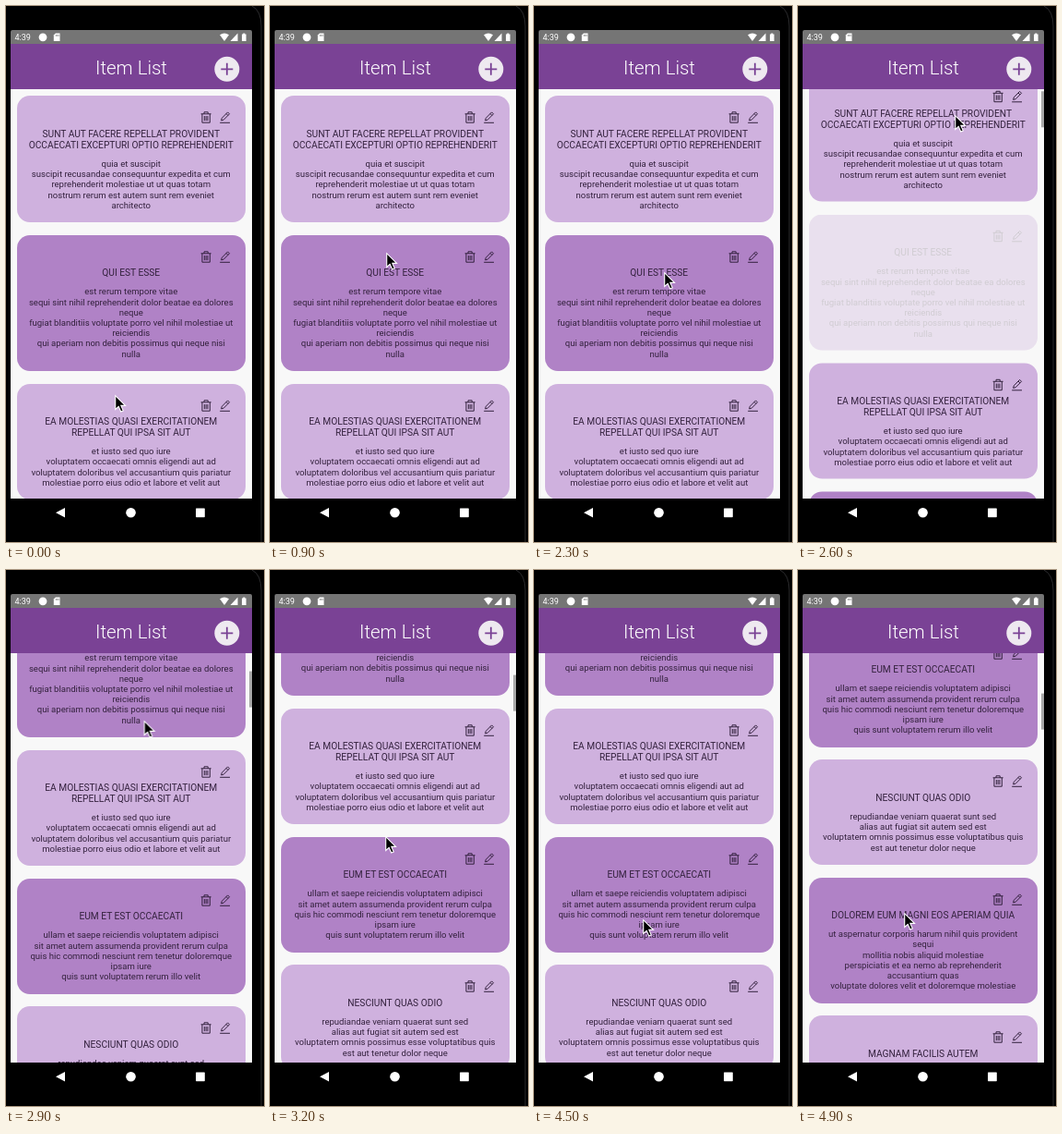
An HTML page that plays this animation: 280x580 px, repeating every 5000 ms.

```html
<!DOCTYPE html>
<html lang="en">
<head>
<meta charset="utf-8">
<title>Item List</title>
<style>
  @property --y { syntax: '<number>'; inherits: true; initial-value: 0; }

  html, body { margin: 0; width: 100%; height: 100%; overflow: hidden; background: #000; }
  .stage { position: relative; width: 280px; height: 580px; overflow: hidden; background: #000; font-family: Roboto, sans-serif; }
  .stage > * { position: absolute; }
  svg { display: block; overflow: visible; }

  .status { left: 5px; top: 26px; width: 262px; height: 15px; background: #757575; border-radius: 2px 2px 0 0; }
  .clock { left: 9.5px; top: 28px; font-size: 9px; line-height: 12px; color: #fff; }
  .header { left: 5px; top: 41px; width: 262px; height: 49.5px; background: #7a4295; }
  .header h1 { margin: 0; font-size: 20.4px; line-height: 52px; font-weight: 300; text-align: center; color: #fff; }

  .list { left: 5px; top: 90px; width: 262px; height: 442.5px; overflow: hidden; background: #f8f8f8; animation: scroll 5s infinite step-end; }
  .cards { position: absolute; left: 6.5px; top: 7.3px; width: 248.5px; transform: translateY(calc(var(--y) * -1px)); }
  .card { position: relative; margin-bottom: 13.4px; padding: 35.35px 0 13.4px; border-radius: 14px; background: #cfb1de; color: #33213d; text-align: center; white-space: pre; }
  .card:nth-child(even) { background: #b082c6; }
  .card:nth-child(2) { animation: press 5s infinite step-end; }
  .card:last-child { min-height: 80px; }
  .card svg { position: absolute; left: 199px; top: 17px; }
  .card h2 { margin: 0 0 8.45px; font-size: 10.2px; line-height: 11.9px; font-weight: 400; }
  .card p { margin: 0; font-size: 9.54px; line-height: 11.2px; }

  .bar { position: absolute; right: 0; top: 0; width: 3px; height: 39px; background: #a9a9a9; opacity: 0; transform: translateY(calc(var(--y) * .09px + .3px)); animation: bar 5s infinite step-end; }
  .cursor { left: 0; top: 0; animation: point 5s infinite step-end; }

  @keyframes scroll {
    0%, 50% { --y: 0; }
    52% { --y: 22.5; }
    54% { --y: 96; }
    56% { --y: 168; }
    58% { --y: 214; }
    60% { --y: 241; }
    62% { --y: 254; }
    64%, 90% { --y: 259; }
    92% { --y: 290; }
    94% { --y: 376; }
    96% { --y: 446; }
    98%, 100% { --y: 481; }
  }
  @keyframes press {
    0%, 48% { opacity: 1; }
    50% { opacity: .6; }
    52% { opacity: .2; }
    54% { opacity: .35; }
    56% { opacity: .7; }
    58%, 100% { opacity: 1; }
  }
  @keyframes bar {
    0% { opacity: 0; }
    52% { opacity: 1; }
    66% { opacity: 1; animation-timing-function: steps(4); }
    74% { opacity: 0; }
    92%, 100% { opacity: 1; }
  }
  @keyframes point {
    0% { transform: translate(118px, 421px); animation-timing-function: steps(9); }
    18% { transform: translate(126px, 267px); }
    26% { transform: translate(126px, 267px); animation-timing-function: steps(4); }
    34% { transform: translate(126px, 370px); animation-timing-function: steps(2); }
    38% { transform: translate(126px, 394px); animation-timing-function: steps(2); }
    42% { transform: translate(129px, 376px); animation-timing-function: steps(2); }
    46% { transform: translate(141px, 288px); animation-timing-function: steps(2); }
    50% { transform: translate(165px, 124px); }
    52% { transform: translate(170px, 118px); }
    54% { transform: translate(168px, 68px); animation-timing-function: steps(4); }
    62% { transform: translate(131px, 258px); }
    64% { transform: translate(125px, 288px); animation-timing-function: steps(6); }
    76% { transform: translate(121px, 378px); animation-timing-function: steps(5); }
    86% { transform: translate(118px, 396px); animation-timing-function: steps(2); }
    90% { transform: translate(118px, 378px); }
    92% { transform: translate(125px, 250px); }
    94% { transform: translate(136px, 62px); }
    96% { transform: translate(127px, 230px); }
    98%, 100% { transform: translate(115px, 371px); }
  }
</style>
</head>
<body>
<div class="stage">
  <svg width="280" height="580" fill="none">
    <path d="M267 0Q277 5 277 22V580" stroke="#2b2b2d"/>
  </svg>

  <div class="status"></div>
  <div class="clock">4:39</div>
  <div class="header"><h1>Item List</h1></div>

  <div class="list">
    <div class="cards"></div>
    <div class="bar"></div>
  </div>

  <svg width="280" height="580" fill="#fff">
    <circle cx="40" cy="33.8" r="4.4"/>
    <path d="M53.8 29.5H58.5V38H51.8V31.6Z"/>
    <path d="M54.3 31v1.8M55.7 31v1.8M57.1 31v1.8" stroke="#757575" stroke-width=".7"/>
    <path d="M232 31.3Q237 27.6 242 31.3L237 38Z"/>
    <path d="M251.5 29.5V38H243.5Z"/>
    <path d="M256 30.4h1.3v-1h2v1h1.3V38H256Z"/>
    <circle cx="239.8" cy="68.3" r="13.5" fill="#eee9f0"/>
    <path d="M233.3 68.3h13M239.8 61.8v13" stroke="#7a4295" stroke-width="1.8"/>
    <path d="M54 548.3L64 543V553.6Z"/>
    <circle cx="135.5" cy="548.3" r="5.3"/>
    <rect x="206" y="543.4" width="9.8" height="9.8" rx=".6"/>
  </svg>

  <svg class="cursor" width="14" height="20">
    <path d="M.7 .7V15.5L4.2 12.3L6.7 18L9.2 16.9L6.8 11.4H11.5Z" fill="#000" stroke="#fff" stroke-width="1.1"/>
  </svg>
</div>

<script>
const items = [
  ['SUNT AUT FACERE REPELLAT PROVIDENT\nOCCAECATI EXCEPTURI OPTIO REPREHENDERIT',
   'quia et suscipit\nsuscipit recusandae consequuntur expedita et cum\nreprehenderit molestiae ut ut quas totam\nnostrum rerum est autem sunt rem eveniet\narchitecto'],
  ['QUI EST ESSE',
   'est rerum tempore vitae\nsequi sint nihil reprehenderit dolor beatae ea dolores\nneque\nfugiat blanditiis voluptate porro vel nihil molestiae ut\nreiciendis\nqui aperiam non debitis possimus qui neque nisi\nnulla'],
  ['EA MOLESTIAS QUASI EXERCITATIONEM\nREPELLAT QUI IPSA SIT AUT',
   'et iusto sed quo iure\nvoluptatem occaecati omnis eligendi aut ad\nvoluptatem doloribus vel accusantium quis pariatur\nmolestiae porro eius odio et labore et velit aut'],
  ['EUM ET EST OCCAECATI',
   'ullam et saepe reiciendis voluptatem adipisci\nsit amet autem assumenda provident rerum culpa\nquis hic commodi nesciunt rem tenetur doloremque\nipsam iure\nquis sunt voluptatem rerum illo velit'],
  ['NESCIUNT QUAS ODIO',
   'repudiandae veniam quaerat sunt sed\nalias aut fugiat sit autem sed est\nvoluptatem omnis possimus esse voluptatibus quis\nest aut tenetur dolor neque'],
  ['DOLOREM EUM MAGNI EOS APERIAM QUIA',
   'ut aspernatur corporis harum nihil quis provident\nsequi\nmollitia nobis aliquid molestiae\nperspiciatis et ea nemo ab reprehenderit\naccusantium quas\nvoluptate dolores velit et doloremque molestiae'],
  ['MAGNAM FACILIS AUTEM', '']
];

const icons = `<svg width="34" height="14" fill="none" stroke="#2c1b36" stroke-width=".95">
<path d="M.6 2.8H11.6M4 2.8V.8H8.2V2.8M1.9 2.8V12.2H10.3V2.8M4.3 5V10.2M6.1 5V10.2M7.9 5V10.2"/>
<path d="M22.6 9.9L23.3 7.3L29.6 .9L31.5 2.8L25.2 9.2ZM28 2.5L29.9 4.4M21.2 12.3H32"/></svg>`;

document.querySelector('.cards').innerHTML = items
  .map(([title, body]) => `<div class="card">${icons}<h2>${title}</h2><p>${body}</p></div>`)
  .join('');
</script>
</body>
</html>
```
